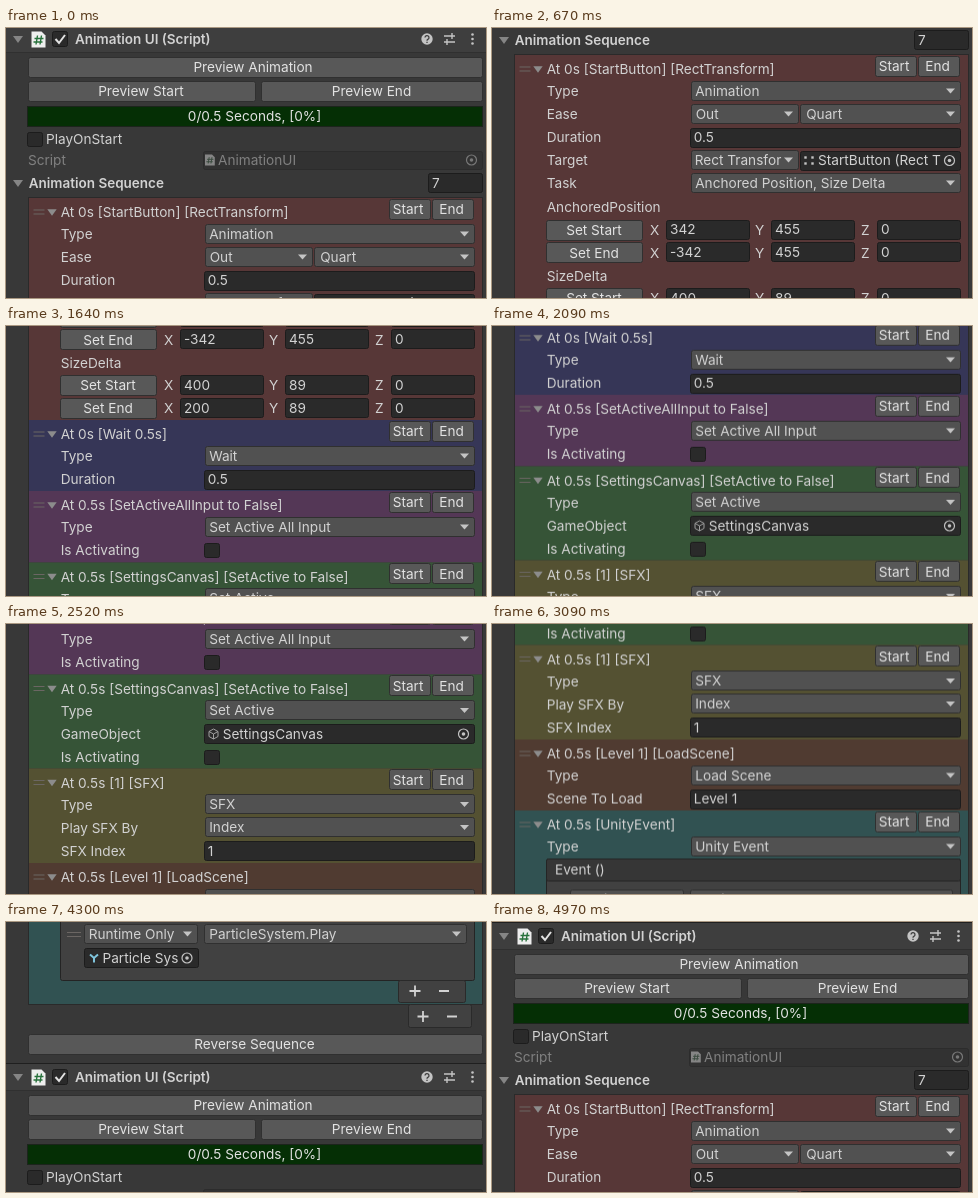
Animation, 480 px wide and 270 px high, one loop 5000 ms. Source, as an HTML page:

```html
<!DOCTYPE html>
<html lang="en">
<head>
<meta charset="utf-8">
<title>Inspector scroll</title>
<style>
html, body { margin: 0; width: 100%; height: 100%; overflow: hidden; background: #383838; }
svg { display: block; width: 480px; height: 270px; overflow: hidden; }
text { font: 13.63px Inter, Roboto, sans-serif; fill: #d2d2d2; white-space: pre; }
.bold { font-size: 13.5px; font-weight: 600; }
.dim { fill: #808080; }
.mid { text-anchor: middle; fill: #e2e2e2; }
</style>
</head>
<body>
<svg viewBox="0 0 480 270"><g id="scroll"><g id="panel"></g></g></svg>
<script>
const panel = document.getElementById('panel');
const LOOP = 5000, FRAMES = 165, PANEL_HEIGHT = 1071;

function add(tag, attrs, content) {
  const el = document.createElementNS('http://www.w3.org/2000/svg', tag);
  for (const key in attrs) el.setAttribute(key, attrs[key]);
  if (content !== undefined) el.textContent = content;
  panel.append(el);
  return el;
}

// Basic shapes; y is the vertical centre for text, icons and controls.
const rect = (x, y, width, height, fill, extra = {}) =>
  add('rect', { x, y, width, height, fill, ...extra });
const path = (d, stroke, width = 1.3, fill = 'none') =>
  add('path', { d, stroke, 'stroke-width': width, fill });
const label = (x, y, str, cls = '') => add('text', { x, y: y + 4.9, class: cls }, str);
// Boxes sit on whole pixels so that their edges stay sharp.
const box = (x1, x2, y, h, fill, stroke, rx = 2) =>
  rect(x1 + .5, Math.round(y - h / 2) + .5, x2 - x1 - 1, h - 1, fill, { stroke, rx });

function triangle(x, y, fill, w = 4.5, h = 5) {
  path(`M${x - w} ${y - h / 2}h${2 * w}l${-w} ${h}z`, 'none', 0, fill);
}
function button(x1, x2, y, str, h = 20, cx = (x1 + x2) / 2) {
  box(x1, x2, y, h, '#585858', '#303030');
  label(cx, y, str, 'mid');
}
function dropdown(x1, x2, y, str, tx = x1 + 3) {
  box(x1, x2, y - .7, 20, '#515151', '#303030');
  label(tx + .7, y - .5, str);
  triangle(x2 - 10.5, y - .5, '#c4c4c4');
}
function input(x1, x2, y, str = '', tx = x1 + 4) {
  box(x1, x2, y, 20, '#2a2a2a', '#1c1c1c');
  label(tx, y, str);
}
function picker(x, y, color = '#c4c4c4') {
  add('circle', { cx: x, cy: y, r: 5, fill: 'none', stroke: color, 'stroke-width': 1.2 });
  add('circle', { cx: x, cy: y, r: 1.8, fill: color });
}
function checkbox(x, y) {
  box(x, x + 16, y, 15, '#2a2a2a', '#1c1c1c');
}
function grip(x, y, w = 11) {
  path(`M${x} ${y - 2}h${w}m${-w} 4h${w}`, '#6b6663', 1);
}
function scriptIcon(x, y, s, paper, ink) {
  path(`M${x} ${y - 8 * s}h${10 * s}l${4 * s} ${4 * s}v${12 * s}h${-14 * s}z`, 'none', 0, paper);
  const cx = x + 7 * s;
  path(`M${cx - 1 * s} ${y - 4 * s}l${-1.5 * s} ${9 * s}M${cx + 3 * s} ${y - 4 * s}l${-1.5 * s} ${9 * s}` +
       `M${cx - 4 * s} ${y - 1 * s}h${9 * s}M${cx - 5 * s} ${y + 2.5 * s}h${9 * s}`, ink, 1.4 * s);
}
function plusMinus(x, y) {
  path(`M${x - 5.5} ${y}h11M${x} ${y - 5.5}v11M${x + 24} ${y}h10`, '#d2d2d2', 1.8);
}

function header() {
  rect(0, -2, 480, 26, '#3e3e3e');
  rect(0, -3, 480, 1, '#1f1f1f');
  rect(0, 24, 480, 1, '#303030');
  triangle(12, 11.5, '#858585', 5, 7);
  scriptIcon(25.5, 11.5, 1, '#eeeeee', '#28723c');
  box(46, 62, 11, 16, '#2a2a2a', '#1c1c1c');
  path('M49.5 11l3.5 4l6-8', '#e2e2e2', 2);
  label(69, 11.5, 'Animation UI (Script)', 'bold');
  add('circle', { cx: 421, cy: 11, r: 5.7, fill: '#c4c4c4' });
  path('M419 9.6a2 2 0 1 1 2.9 1.8q-.9.5-.9 1.4M421 13.7v1.3', '#3e3e3e', 1.3);
  path('M438 8h11M438 14h11M446 5v6M441 11v6', '#c4c4c4', 1.4);
  for (const y of [6.5, 11, 15.5]) add('circle', { cx: 466.5, cy: y, r: 1.3, fill: '#c4c4c4' });
}

function controls() {
  button(22, 477, 39.5, 'Preview Animation', 21, 247);
  button(22, 250, 63, 'Preview Start', 21, 135);
  button(255, 477, 63, 'Preview End', 21, 365.5);
  box(21, 477, 88.5, 21, '#052f05', '#1c241c', 0);
  label(248.5, 88.5, '0/0.5 Seconds, [0%]', 'mid');
  checkbox(21, 111.5);
  label(40, 111.5, 'PlayOnStart');
  label(22, 132, 'Script', 'dim');
  box(197, 477, 132, 19, '#323232', '#2c2c2c');
  scriptIcon(199, 132, .7, '#858585', '#3a4a3e');
  label(212, 132, 'AnimationUI', 'dim');
  picker(465.5, 132, '#787878');
  triangle(12, 155.5, '#858585', 5, 7);
  label(22.7, 155.2, 'Animation Sequence', 'bold');
  input(422, 477, 155, '7', 426);
}

function section(top, bottom, color, title, hasButtons = true) {
  rect(23, top, 453, bottom - top, color);
  grip(27.5, top + 14);
  triangle(46, top + 14.5, '#8c8c8c', 4.7, 6.5);
  label(54.7, top + 14.5, title);
  if (hasButtons) {
    button(383, 425, top + 11.3, 'Start', 21, 402);
    button(426, 468, top + 11.3, 'End', 21, 445.5);
  }
  return i => top + 36.5 + 23 * i;
}
function choice(y, name, value) {
  label(54.7, y, name);
  dropdown(199, 469, y, value, 202.5);
}
function entry(y, name, value) {
  label(54.7, y, name);
  input(198, 469, y, value, 201.8);
}
function toggle(y) {
  label(54.7, y, 'Is Activating');
  checkbox(198, y);
}
function vector(y, name, values) {
  button(54, 151, y, name, 21, 102);
  values.forEach((v, i) => {
    const x = 174 + Math.floor(105.5 * i);
    label(x - 16, y, 'XYZ'[i]);
    input(x, x + 84, y - .5, v);
  });
}

function sequence() {
  const tops = [170, 448, 519, 590.5, 684.5, 779, 850, 1009];
  const next = (i, ...args) => section(tops[i], tops[i + 1], ...args);

  let row = next(0, '#573737', 'At 0s [StartButton] [RectTransform]');
  choice(row(0), 'Type', 'Animation');
  label(54.7, row(1), 'Ease');
  dropdown(199, 307, row(1), 'Out', 203);
  dropdown(308, 469, row(1), 'Quart', 313.5);
  entry(row(2), 'Duration', '0.5');
  label(54.7, row(3), 'Target');
  dropdown(199, 307, row(3), 'Rect Transfor', 202);
  input(308, 469, row(3), 'StartButton (Rect T', 326);
  for (const dx of [-3.5, 3.5]) for (const dy of [-3, 3])
    rect(317 + dx - 1.2, row(3) + dy - 1.2, 2.4, 2.4, '#c4c4c4');
  picker(457.5, row(3));
  choice(row(4), 'Task', 'Anchored Position, Size Delta');
  label(54.7, 322.5, 'AnchoredPosition');
  vector(345, 'Set Start', ['342', '455', '0']);
  vector(367.7, 'Set End', ['-342', '455', '0']);
  label(54.7, 391, 'SizeDelta');
  vector(413.5, 'Set Start', ['400', '89', '0']);
  vector(436.5, 'Set End', ['200', '89', '0']);

  row = next(1, '#363657', 'At 0s [Wait 0.5s]');
  choice(row(0), 'Type', 'Wait');
  entry(row(1), 'Duration', '0.5');

  row = next(2, '#543756', 'At 0.5s [SetActiveAllInput to False]');
  choice(row(0), 'Type', 'Set Active All Input');
  toggle(row(1));

  row = next(3, '#365437', 'At 0.5s [SettingsCanvas] [SetActive to False]');
  choice(row(0), 'Type', 'Set Active');
  entry(row(1), 'GameObject', '');
  label(216.7, row(1), 'SettingsCanvas');
  path(`M207.5 ${row(1) - 5}l4.5 2.5v5l-4.5 2.5l-4.5-2.5v-5zM203 ${row(1) - 2.5}l4.5 2.5l4.5-2.5M207.5 ${row(1)}v5`, '#a0a0a0', 1);
  picker(457.5, row(1));
  toggle(row(2));

  row = next(4, '#545132', 'At 0.5s [1] [SFX]');
  choice(row(0), 'Type', 'SFX');
  choice(row(1), 'Play SFX By', 'Index');
  entry(row(2), 'SFX Index', '1');

  row = next(5, '#503b31', 'At 0.5s [Level 1] [LoadScene]', false);
  choice(row(0), 'Type', 'Load Scene');
  entry(row(1), 'Scene To Load', 'Level 1');

  row = next(6, '#315252', 'At 0.5s [UnityEvent]');
  choice(row(0), 'Type', 'Unity Event');
  eventList(898.5);

  rect(22.5, 169.5, 454, 840, 'none', { stroke: '#2a2a2a' });
  box(402, 466, 1021, 24, '#414141', '#2a2a2a');
  plusMinus(417, 1021.5);
  button(22, 477, 1049.3, 'Reverse Sequence', 21, 248.5);
}

function eventList(y) {
  box(54, 469, y + 43.5, 88, '#414141', '#242424');
  box(54, 469, y + 11, 23, '#363636', '#242424');
  label(63, y + 11, 'Event ()');
  grip(61, y + 41, 14);
  dropdown(78, 192, y + 41, 'Runtime Only', 82);
  dropdown(198, 461, y + 41, 'ParticleSystem.Play', 202.5);
  input(78, 193, y + 64.5, 'Particle Sys', 96.5);
  path(`M84 ${y + 61}l4 3.5l4-3.5M88 ${y + 64}v5`, '#7fc4dc', 2);
  picker(181, y + 64.5);
  box(392, 460, y + 98, 23, '#414141', '#2a2a2a');
  plusMinus(409, y + 97.5);
}

header();
controls();
sequence();

const scroll = document.getElementById('scroll');
const copy = panel.cloneNode(true);
copy.removeAttribute('id');
copy.setAttribute('transform', `translate(0 ${PANEL_HEIGHT})`);
scroll.append(copy);

// [step, scroll offset]; each stretch advances in even steps.
const stops = [[0, 0], [22, 143], [54, 354], [83, 540], [121, 787],
               [142, 927], [164, 1068], [FRAMES, PANEL_HEIGHT]];
const keyframes = stops.map(([step, offset], i) => ({
  offset: step / FRAMES,
  transform: `translateY(${-offset}px)`,
  easing: i < stops.length - 1 ? `steps(${stops[i + 1][0] - step}, end)` : 'linear'
}));
scroll.animate(keyframes, { duration: LOOP, iterations: Infinity, delay: -5 });
</script>
</body>
</html>
```
